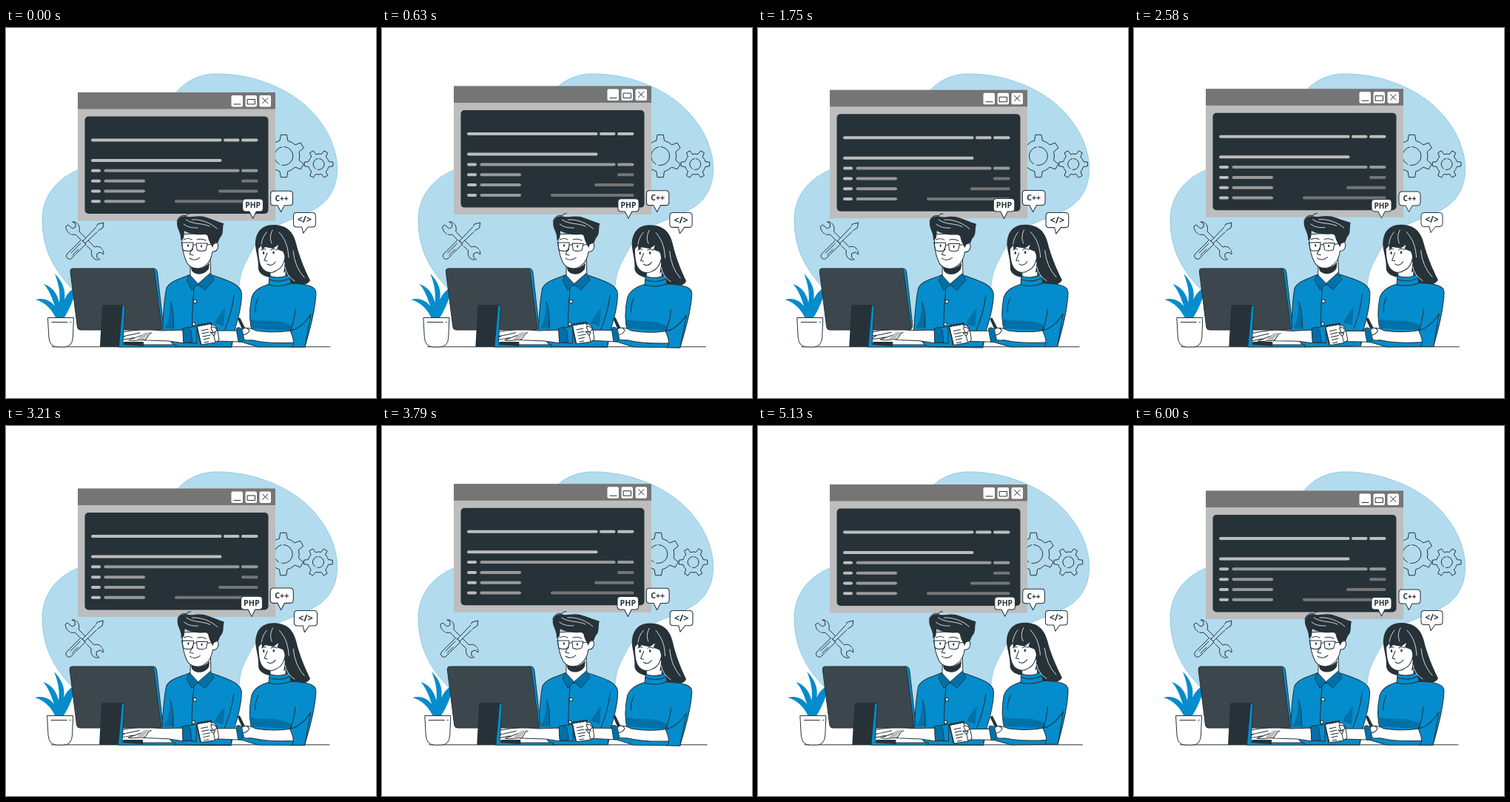
Animation, 500 px wide and 500 px high, one loop 6.04 s. Source, as an HTML page:

```html
<!DOCTYPE html>
<html lang="en">
<head>
<meta charset="utf-8">
<title>Two developers</title>
<style>
html,body{margin:0;width:100%;height:100%;overflow:hidden;background:#fff}
svg{display:block;width:100vw;height:100vh}
.ink{fill:none;stroke:#263238;stroke-width:1;stroke-linecap:round;stroke-linejoin:round}
.white{fill:#fff;stroke:#263238;stroke-width:1;stroke-linejoin:round}
.blue{fill:#048ccc;stroke:#263238;stroke-width:1;stroke-linejoin:round}
.deep{fill:#0070a8;stroke:#263238;stroke-width:.8;stroke-linejoin:round}
.shade{fill:#0070a8}
.dark{fill:#263238}
.sky{fill:#b2dbee}
.shine{fill:none;stroke:#fff;stroke-width:.8;stroke-linecap:round}
text{font:bold 10px "Open Sans","Noto Sans",sans-serif;font-stretch:75%;fill:#263238;text-anchor:middle}
.tag{font-size:12px;font-stretch:100%}
</style>
</head>
<body>
<svg viewBox="0 0 500 500" id="stage">
  <path class="sky" stroke="#7dbfe0" stroke-width=".7" d="M97 192C70 203 49 226 49 260C49 310 76 342 108 370C150 400 240 405 290 385C322 370 311 345 320 325C332 300 341 280 365 268C386 257 407 253 426 239C457 214 453 165 425 127C396 85 335 60 280 62C252 64 238 78 229 88C190 130 150 170 97 192Z"/>

  <g id="icons">
    <path id="bigGear" class="ink"/><path id="smallGear" class="ink"/>
    <circle class="ink" cx="375.500" cy="173" r="12.500" stroke-dasharray="22 4 30 3"/>
    <circle class="ink" cx="422.700" cy="184" r="7.500" stroke-dasharray="13 3 18 2"/>
    <g stroke-dasharray="26 2">
      <path class="ink" style="fill:#b2dbee" d="M84 266L90 271L94 269L94 264L90 262C97 261 101 268 99 275L120 296C126 293 133 299 132 306L128 303L123 305L123 310L127 313C119 315 114 308 116 301L94 279C87 281 81 275 81 268Z"/>
      <path class="ink" style="fill:#b2dbee" d="M83 305L102 286L108 292L89 311C85 315 79 309 83 305ZM104 288L122 269L124 265L132 263L131 270L126 273L107 291Z"/>
      <path class="ink" d="M88 304L101 291M90 307L98 299"/>
    </g>
  </g>

  <g id="window">
    <path fill="#bdbdbd" d="M97 87.500H364V261H97Z"/>
    <path fill="#757575" d="M97 87.500H364V110H97Z"/>
    <rect class="dark" x="106.500" y="120" width="248" height="131.500" rx="5"/>
    <g id="buttons"></g>
    <path class="ink" d="M308 103.500H317M326.500 97H336.500V103.500H326.500ZM346.500 95L354 102.500M354 95L346.500 102.500"/>
    <g id="code" stroke-width="4" stroke-linecap="round"></g>
  </g>

  <g id="man">
    <path class="blue" d="M247 334C236 339 223 341 217 351C213 368 213 391 211 410L229 431H305L310 405C315 390 319 370 318.500 358C317 347 303 342 279 334Z"/>
    <path class="shade" d="M222 371L228 406H214C220 396 222 384 222 371ZM296 378C290 386 285 392 282 399L294 403Z"/>
    <path class="ink" d="M308 361C306 380 301 395 296 407M222 370C226 380 227 393 226 406M254 352C252 378 251 395 252 406M305 428L309 408"/>
    <path class="white" d="M249 317L249 336L259 348L277 336L276 310Z"/>
    <path class="dark" d="M249 320C256 327 266 327 275 317L274 325C269 334 256 335 251 328Z"/>
    <path class="deep" d="M248 333L244 341L251 354L260 346ZM276 331L281 340L269 354L259 346Z"/>
    <circle class="white" cx="255.500" cy="369.500" r="2.200"/><circle class="white" cx="254" cy="400" r="2"/>
    <path class="white" d="M239 279C236 289 239 307 245 318C250 326 262 327 269 321C275 317 278 309 279 302C286 303 289 293 284 289L280 276Z"/>
    <path class="dark" d="M231 266C230 259 236 252 246 255C251 256 259 253 268 255C278 258 287 262 294 264C292 271 294 276 291 281C287 285 288 289 285 291C282 289 280 293 279 297L275 289C272 283 274 279 268 279C256 280 247 278 241 274L240 284L236 287C237 278 232 273 231 266Z"/>
    <path class="ink" d="M231 261C233 255 239 252 243 254C244 252 247 250 249 251"/>
    <path class="shine" d="M243 259C253 266 265 263 275 268M251 259C263 258 276 263 285 271M240 265C246 270 253 270 259 270"/>
    <path class="ink" d="M237 290H253L252 300Q245 303 239 300ZM257 291H272L270 300Q264 303 258 300ZM253 293H257M272 293L283 291M240 286Q246 283 251 286M258 286Q264 284 270 287M253 295L248 306L253 307M248 311Q255 316 262 310"/>
    <ellipse class="dark" cx="246" cy="294" rx="1.100" ry="1.800"/><ellipse class="dark" cx="264" cy="295" rx="1.100" ry="1.800"/>
    <path class="white" d="M240 408L210 409L191 407C181 408 164 409 155 412C151 415 155 418 162 416L155 420C157 424 169 418 174 419L166 422C177 424 183 420 190 422L220 423L241 426Z"/>
    <path class="ink" d="M163 416L181 412M174 419L187 414M187 422C193 419 191 413 197 412"/>
    <path fill="#bdbdbd" d="M177 421L187 412L195 411L186 421Z"/>
    <path class="blue" d="M239 406L258 403V426L240 425Z"/>
    <path class="deep" d="M239 406C245 403 249 406 250 409L252 425L240 425Z"/>
  </g>

  <g id="desk">
    <path class="ink" d="M62.500 430.800H438"/>
    <path fill="#048ccc" d="M67 391C62 381 54 371 40 367C51 364 60 368 66 376C62 364 58 353 51 346C64 350 70 361 72 371C74 358 71 345 66 332C77 343 81 355 79 367C82 360 87 354 96 349C92 366 86 380 79 391Z"/>
    <path class="white" d="M56.500 391.500H91.500L90.500 418Q89.500 431 79 431H70Q59 431 58 418Z"/>
    <path class="ink" d="M62 397.500H83M87 397.500H88"/>
    <path class="blue" d="M196 325H201Q204 326 204.500 330L212.500 401Q212.500 408 208 408Z"/>
    <path fill="#3c474d" stroke="#263238" d="M90 325H197Q200 325 200.500 328L210.500 404Q211 408 207 408H101Q97 408 96.500 404L87 329Q87 325 90 325Z"/>
    <path class="blue" d="M157 375L161 375L158 425L185 426V428L230 428V431H152Z"/>
    <path class="dark" d="M130 376Q130 374 132 374H158L153 431H127ZM160 424H186V430L158 428Z"/>
  </g>

  <g id="woman">
    <path class="dark" d="M337 295C336 278 344 266 361 266C379 266 388 275 392 291C396 308 404 327 411 341C407 349 394 349 382 345L356 337C346 335 340 330 341 322C341 312 338 304 337 295Z"/>
    <path class="blue" d="M356 346C346 349 336 353 332 364C328 383 329 398 333 412L320 408L314 423L341 431H404C409 413 418 385 419 358C419 350 411 346 384 345Z"/>
    <path class="shade" d="M330 393C345 399 363 391 386 402L388 409L333 406Z"/>
    <path class="white" d="M357 322L357 339H378V315Z"/>
    <path class="blue" d="M356 335Q369 340 383 333L385 345Q370 351 355 347Z"/>
    <path class="ink" d="M356 340Q370 345 384 338M391 380C390 391 388 401 384 409M341 364Q336 374 337 384"/>
    <path class="white" d="M341 289C340 300 341 314 344 321C348 330 358 333 365 328C373 325 377 316 378 303L374 286L346 284Z"/>
    <path class="dark" d="M340 300C339 284 348 274 361 271C376 272 385 285 385 302C387 315 382 326 375 331C377 320 378 308 374 302L366 299L368 293L361 298L350 296L346 300L345 294Z"/>
    <path class="shine" d="M352 276C347 282 346 287 345 292M360 273C356 281 357 286 359 291M369 276C379 287 381 298 382 310M388 301Q390 323 403 337M377 323Q379 335 390 342"/>
    <path class="ink" d="M345 300Q348 298 351 299M358 300Q362 297 366 300M353 304L349 314L353 315M353 319Q359 323 364 316"/>
    <ellipse class="dark" cx="348" cy="304" rx="1.200" ry="2"/><ellipse class="dark" cx="361.500" cy="303.500" rx="1.200" ry="2"/>
    <path class="white" d="M388 408C374 412 350 411 338 409C331 405 323 404 318 408L316 419C323 424 328 421 334 422C350 426 371 426 391 425Z"/>
    <path class="blue" d="M384 409Q398 407 412 387L404 431H386Q392 426 384 409Z"/>
    <path class="dark" d="M313 393L316 391L324 407L320 409Z"/>
    <path class="white" d="M318 408Q325 402 329 409Q326 415 319 415Z"/>
    <path class="white" d="M281 409L312 409L315 424L284 423Z"/>
    <path class="deep" d="M311 406Q315 403 319 407L322 421Q318 426 314 424Z"/>
    <path class="white" d="M276 402C280 399 285 403 286 409L288 421C285 426 280 424 278 420Z"/>
    <path class="white" d="M258 403L277 399L283 425L264 428Z"/>
    <path class="ink" d="M264 409L273 407M265 413L274 411M266 417L276 415M267 421L275 419M268 425L274 424"/>
    <path class="ink" style="stroke-width:3;stroke-dasharray:1 3" d="M260 402L278 399"/>
    <path class="white" d="M277 405C280 403 285 405 285 409L280 412ZM276 411L283 412L281 416Z"/>
    <path class="ink" style="stroke-width:1.500" d="M258 403L263 427"/>
  </g>

  <g id="bubbles">
    <path class="white" d="M325 231.500H344Q348 231.500 348 235.500V244Q348 248 344 248H339L334.500 257L330 248H325Q321 248 321 244V235.500Q321 231.500 325 231.500Z"/>
    <path class="white" d="M362 221H383Q387 221 387 225V236Q387 240 383 240H376L371.500 248.500L367 240H362Q358 240 358 236V225Q358 221 362 221Z"/>
    <path class="white" d="M392 249.500H413Q417 249.500 417 253.500V264.500Q417 268.500 413 268.500H407L401 276.500L399 268.500H392Q388 268.500 388 264.500V253.500Q388 249.500 392 249.500Z"/>
    <text x="334.500" y="243.500">PHP</text><text x="372.500" y="234">C++</text><text class="tag" x="402.500" y="263">&lt;/&gt;</text>
  </g>
</svg>
<script>
const LOOP = 6040, LEAD = 40;
const get = id => document.getElementById(id);

function gearPath(cx, cy, root, tip, turn) {
  const teeth = 6, half = Math.PI / teeth;
  const points = [];
  for (let i = 0; i < teeth; i++) {
    const middle = 2 * half * (i + turn) - Math.PI / 2;
    for (const [offset, r] of [[-.9, root], [-.48, root], [-.27, tip], [.27, tip], [.48, root]]) {
      const a = middle + offset * half;
      points.push((cx + r * Math.cos(a)).toFixed(2) + " " + (cy + r * Math.sin(a)).toFixed(2));
    }
  }
  return "M" + points.join("L") + "Z";
}
get("bigGear").setAttribute("d", gearPath(375.5, 173, 21.5, 29, 0));
get("smallGear").setAttribute("d", gearPath(422.7, 184, 14, 19.5, .5));

get("buttons").innerHTML = [304.5, 323.5, 342.5].map(x =>
  `<rect x="${x}" y="91.500" width="15.500" height="15.500" rx="2" fill="#fff"/>`).join("");

const LIGHT = "#bdbdbd", MID = "#999", DIM = "#757575";
const lines = [
  [152, [117, 289.5, LIGHT], [296, 313.5, LIGHT], [320, 338.5, LIGHT]],
  [179.5, [117, 289.5, LIGHT]],
  [193.3, [117, 126, LIGHT], [134.5, 313.5, MID], [320, 338.5, MID]],
  [207.2, [117, 126, LIGHT], [134.5, 186, MID], [320, 338.5, DIM]],
  [221, [117, 126, LIGHT], [134.5, 186, MID], [289, 338.5, DIM]],
  [234.8, [117, 126, LIGHT], [134.5, 186, MID], [230, 338.5, DIM]]
];
get("code").innerHTML = lines.map(([y, ...parts]) => parts.map(([from, to, color]) =>
  `<path stroke="${color}" d="M${from} ${y}H${to}"/>`).join("")).join("");

// Keyframes as [progress, value] pairs, joined linearly.
const FLOAT = [[0, 0], [.5, -10], [1, 0]];
const SWAY = [[0, 0], [.25, 1], [.75, -1], [1, 0]];
const BEAT = [[0, 1], [.1, 1.1], [.3, 1], [.4, 1], [.5, 1.1], [.6, 1], [1, 1]];
const SHAKE = [[0, 0], [.1, -1], [.2, 2], [.3, -4], [.4, 4], [.5, -4],
  [.6, 4], [.7, -4], [.8, 2], [.9, -1], [1, 0]];

function sample(keys, p) {
  const i = keys.findIndex(key => key[0] > p);
  const [p0, v0] = keys[i - 1], [p1, v1] = keys[i];
  return v0 + (v1 - v0) * (p - p0) / (p1 - p0);
}

function draw(time) {
  const at = (keys, repeats) => sample(keys, ((time + LEAD) / LOOP * repeats) % 1);
  const move = (id, value) => get(id).setAttribute("transform", value);
  move("window", `translate(0 ${at(FLOAT, 4)})`);
  move("icons", `translate(${at(SHAKE, 2)} 0)`);
  move("desk", `translate(${at(SHAKE, 1)} 0)`);
  move("man", `rotate(${at(SWAY, 4)} 236 341)`);
  move("woman", `rotate(${at(SWAY, 2)} 337.5 349)`);
  move("bubbles", `translate(369 248.5) scale(${at(BEAT, 4)}) translate(-369 -248.5)`);
}

const start = performance.now();
function tick() {
  draw((performance.now() - start) % LOOP);
  requestAnimationFrame(tick);
}
tick();
</script>
</body>
</html>
```
